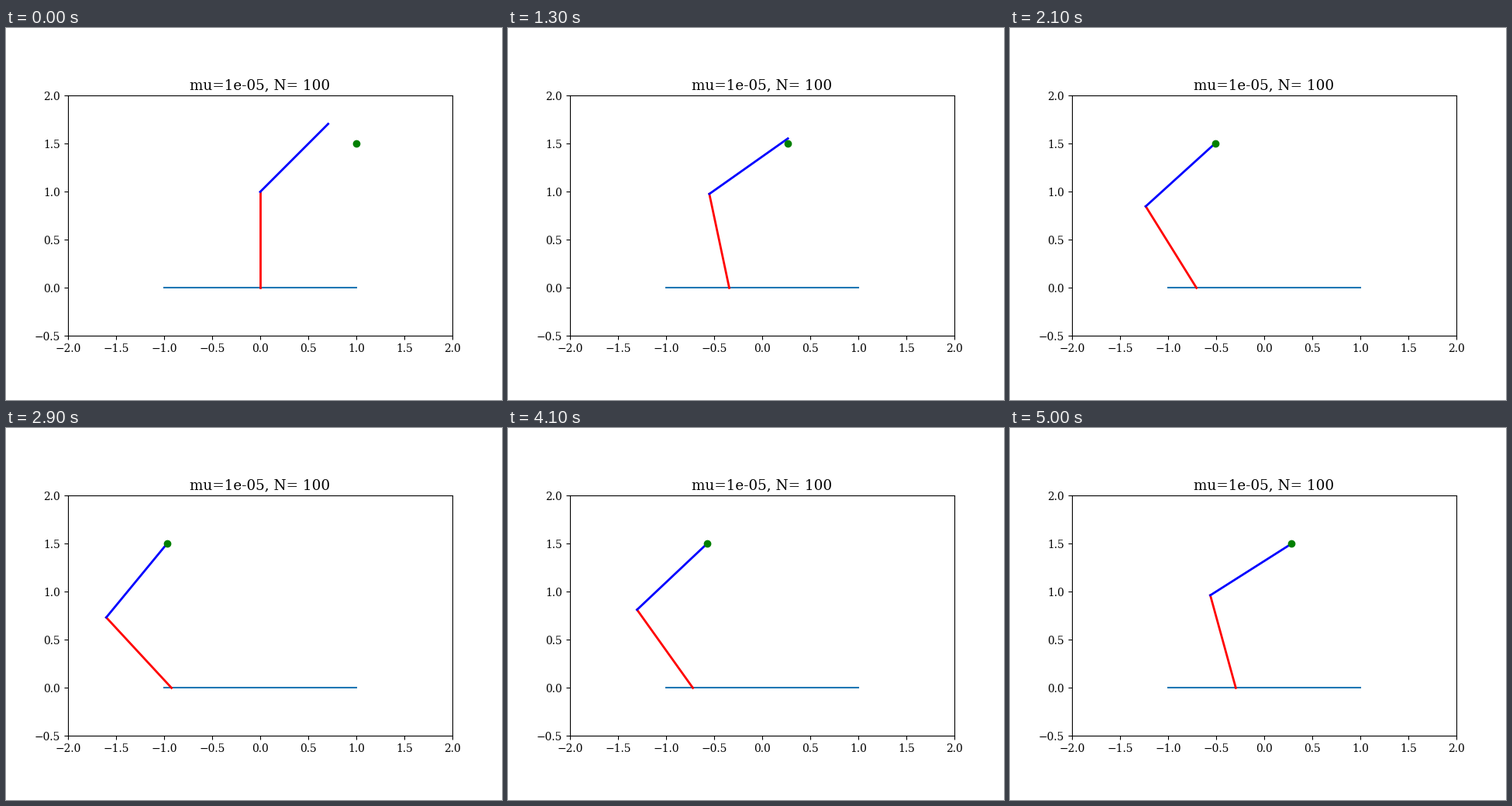
Recreate the animation shown at these times as a matplotlib script. Size 640x480 px, loop 5.05 s.

```python
import numpy as np
import matplotlib.pyplot as plt
from matplotlib.animation import FuncAnimation

plt.rcParams["font.family"] = "DejaVu Serif"

FRAMES, INTERVAL = 101, 50
DT = 0.05
GOAL_Y = 1.5
START = np.array([np.sqrt(0.5), 1 + np.sqrt(0.5)])
MISS = np.array([1.0, GOAL_Y]) - START


def smooth(u):
    u = np.clip(u, 0, 1)
    return u * u * (3 - 2 * u)


def base_x(t):
    """Slider position: follows the goal, with a small late drift."""
    return 0.468 * (np.cos(t) - 1) + 0.041 * smooth((t - 3.3) / 1.9)


def tip(t):
    """Arm tip: the goal minus a decaying tracking error."""
    ex = MISS[0] * np.exp(-1.4 * t) * np.cos(1.2 * t)
    ey = MISS[1] * np.exp(-t - 0.01 * t**4)
    return np.array([np.cos(t) - ex, GOAL_Y - ey])


def elbow(a, b):
    """Left meeting point of unit circles around a and b."""
    d = b - a
    dist = np.hypot(*d)
    h = np.sqrt(max(0.0, 1 - dist**2 / 4))
    return (a + b) / 2 + h * np.array([-d[1], d[0]]) / dist


fig, ax = plt.subplots(figsize=(6.4, 4.8), dpi=100)
ax.set_aspect("equal")
ax.set_xlim(-2, 2)
ax.set_ylim(-0.5, 2)
ax.set_xticks(np.arange(-2, 2.1, 0.5))
ax.set_title("mu=1e-05, N= 100", fontsize=13.2)

ax.plot([-1, 1], [0, 0])
lower, = ax.plot([], [], "r", lw=2)
upper, = ax.plot([], [], "b", lw=2)
goal, = ax.plot([], [], "go")


def draw(i):
    t = i * DT
    foot, hand = np.array([base_x(t), 0.0]), tip(t)
    joint = elbow(foot, hand)
    lower.set_data(*zip(foot, joint))
    upper.set_data(*zip(joint, hand))
    goal.set_data([np.cos(t)], [GOAL_Y])
    return lower, upper, goal


anim = FuncAnimation(fig, draw, frames=FRAMES, interval=INTERVAL,
                     init_func=lambda: draw(0), repeat=True, repeat_delay=0)
plt.show()
```
